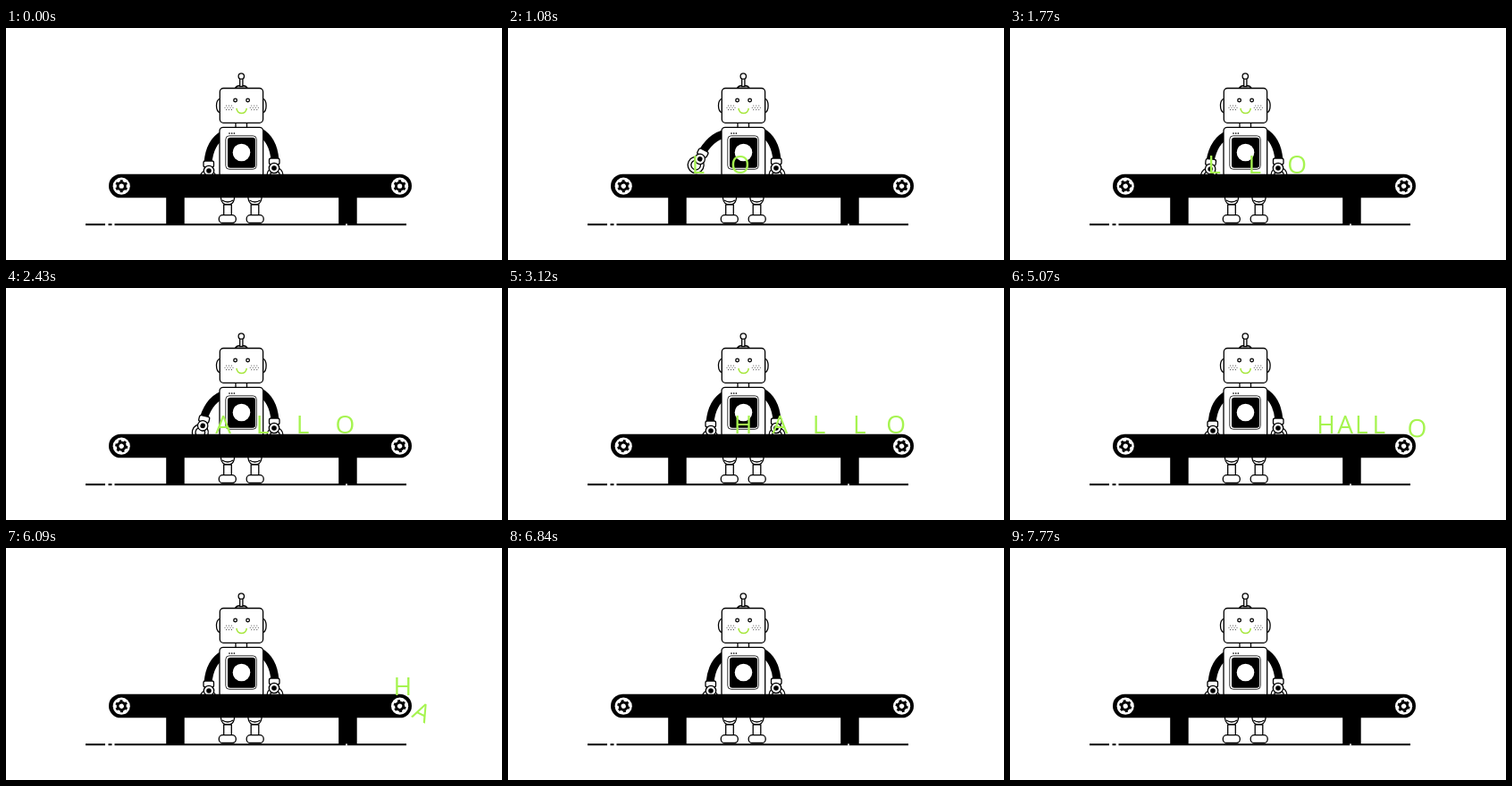
Write an HTML page that moves like this. It is 555 px wide and 260 px high and loops after 7.8 s.

```html
<!DOCTYPE html>
<html lang="de">
<head>
<meta charset="utf-8">
<title>Hallo</title>
<style>
html, body { margin: 0; width: 100%; height: 100%; overflow: hidden; background: #fff; }
svg { display: block; width: 555px; height: 260px; }
.line { fill: #fff; stroke: #000; stroke-width: 1.3; }
.thin { stroke-width: .8; }
.word { font: 400 28px "Open Sans", "Noto Sans", sans-serif; fill: #a6f450; text-anchor: middle; }
</style>
</head>
<body>
<svg viewBox="0 0 555 260">
  <defs>
    <g id="arm">
      <path d="M243 119.500Q228 128 226 151" fill="none" stroke="#000" stroke-width="9"/>
      <g class="line">
        <circle cx="226" cy="168" r="9"/>
        <circle cx="226" cy="168" r="5.3"/>
        <rect x="221" y="149" width="11.5" height="7" rx="2"/>
        <circle cx="227" cy="160" r="5.7"/>
      </g>
      <circle cx="227" cy="160" r="2.8"/>
    </g>
    <g id="leg" class="line">
      <path d="M240.500 188v3q1 7 7.500 7t7.500-7v-3z"/>
      <path d="M242 193q6 4 12 0" fill="none"/>
      <rect x="243.700" y="198" width="8.600" height="13"/>
      <rect x="238.300" y="209.700" width="19" height="8.800" rx="4"/>
    </g>
    <path id="cheek" d="M246.500 87h6.100M245 89.300h9.100M246.500 91.600h6.100" fill="none" stroke="#333" stroke-width="1.100" stroke-linecap="round" stroke-dasharray="0 3"/>
    <g id="gear"></g>
  </defs>

  <path d="M89 220.300H111M114.500 220.300H118.500M121.500 220.300H448" stroke="#000" stroke-width="2"/>

  <g id="robot">
    <use href="#leg"/>
    <use href="#leg" transform="translate(526.500 0) scale(-1 1)"/>
    <g id="left"><use href="#arm"/></g>
    <use href="#arm" transform="translate(527 -3) scale(-1 1)"/>
    <g class="line">
      <rect x="257" y="104" width="12.500" height="9"/>
      <path d="M256.500 67.500q1-3 6.800-3t6.800 3z"/>
      <rect x="261.700" y="56" width="3.200" height="9.500"/>
      <circle cx="263.300" cy="54" r="3.200"/>
      <path d="M239.500 79q-4 1.500-4 8t4 8zM287.500 79q3.600 1.500 3.600 8t-3.600 8z"/>
      <rect x="239.300" y="67.500" width="48.300" height="38.800" rx="4"/>
      <rect x="239" y="111.300" width="48.700" height="56" rx="4"/>
      <rect class="thin" x="245.800" y="120.800" width="34.500" height="37.500" rx="4"/>
      <circle cx="256.600" cy="81" r="1.800"/>
      <circle cx="270.600" cy="81" r="1.800"/>
    </g>
    <use href="#cheek"/>
    <use href="#cheek" x="28.300"/>
    <path d="M258 90a5.600 5.600 0 0 0 11.200 0" fill="none" stroke="#a5e63a" stroke-width="1.500"/>
    <path d="M250 118h6" stroke="#000" stroke-width="1.700" stroke-linecap="round" stroke-dasharray="0 2.700"/>
    <rect x="248" y="122.700" width="31" height="34" rx="3"/>
    <circle cx="263.500" cy="139.500" r="9.800" fill="#fff"/>
  </g>

  <path d="M179.200 188h20.500v32.800h-20.500zM372.200 188h20.500v32.800h-20.500z"/>
  <path d="M380 220.500h2" stroke="#fff" stroke-width="2"/>
  <rect x="115" y="163.700" width="339" height="26.600" rx="13.300"/>
  <g fill="#fff"><circle cx="129.200" cy="177.200" r="9.600"/><circle cx="440.600" cy="177.200" r="9.600"/></g>
  <use href="#gear" class="wheel"/>
  <use href="#gear" class="wheel"/>
  <g id="word" class="word"></g>
</svg>
<script>
const LOOP = 7800, RESTART = 4830, SPEED = 0.0885, TEETH = 6;
const NS = "http://www.w3.org/2000/svg";
const $ = id => document.getElementById(id);
const clamp = v => Math.max(0, Math.min(1, v));

function add(parent, tag, attrs, text) {
  const el = document.createElementNS(NS, tag);
  for (const k in attrs) el.setAttribute(k, attrs[k]);
  if (text) el.textContent = text;
  return parent.appendChild(el);
}

// Gear: ring plus teeth
add($("gear"), "circle", { r: 4.1, fill: "none", stroke: "#000", "stroke-width": 2.9 });
for (let i = 0; i < TEETH; i++)
  add($("gear"), "rect", { x: -1.5, y: -7, width: 3, height: 2.6, transform: `rotate(${i * 360 / TEETH})` });

// placed: time at the hand; rest: queue position; leave: time it moves on
const letters = [
  { ch: "O", placed: 550,  rest: 435,   leave: 4840 },
  { ch: "L", placed: 1085, rest: 412.3, leave: 5065 },
  { ch: "L", placed: 1595, rest: 392.8, leave: 5065 },
  { ch: "A", placed: 2090, rest: 374.5, leave: 5065 },
  { ch: "H", placed: 2555, rest: 353,   leave: 5065 }
];
for (const l of letters) l.el = add($("word"), "text", { y: 10 }, l.ch);

const wheels = [...document.querySelectorAll(".wheel")].map((el, i) => ({
  el, x: [129.2, 440.6][i], stop: [4460, 4070][i], steps: [48, 46][i]
}));

function letterX(l, t) {
  if (t > l.leave) return l.rest + SPEED * (t - l.leave);
  const gap = l.rest - 213 - SPEED * (t - l.placed);
  return l.rest - 4 * Math.log(1 + Math.exp(gap / 4));
}

function drawLetter(l, t) {
  const x = letterX(l, t);
  const past = Math.max(0, x - 435);
  const fall = Math.max(0, past - 19);
  const y = 153.3 + 0.17 * past + 0.2 * fall * fall;
  l.el.setAttribute("transform", `translate(${x} ${y}) rotate(${2.3 * fall})`);
  l.el.setAttribute("opacity", clamp((t - l.placed + 90) / 60) * clamp((38 - past) / 3));
}

function draw(now) {
  const t = now % LOOP;
  let reach = 0;
  for (const l of letters) {
    drawLetter(l, t);
    const p = Math.abs(t - l.placed) / 250;
    if (p < 1) reach = Math.max(reach, Math.cos(p * Math.PI / 2) ** 2);
  }
  $("left").setAttribute("transform", `translate(${4 * reach} ${-3 * reach}) rotate(${27 * reach} 240 121)`);

  for (const w of wheels) {
    const run = Math.min(t, w.stop) + Math.max(0, t - RESTART);
    const angle = w.steps * 360 / TEETH * run / (w.stop + LOOP - RESTART);
    w.el.setAttribute("transform", `translate(${w.x} 177.2) rotate(${angle})`);
  }
  requestAnimationFrame(draw);
}
draw(performance.now());
</script>
</body>
</html>
```
